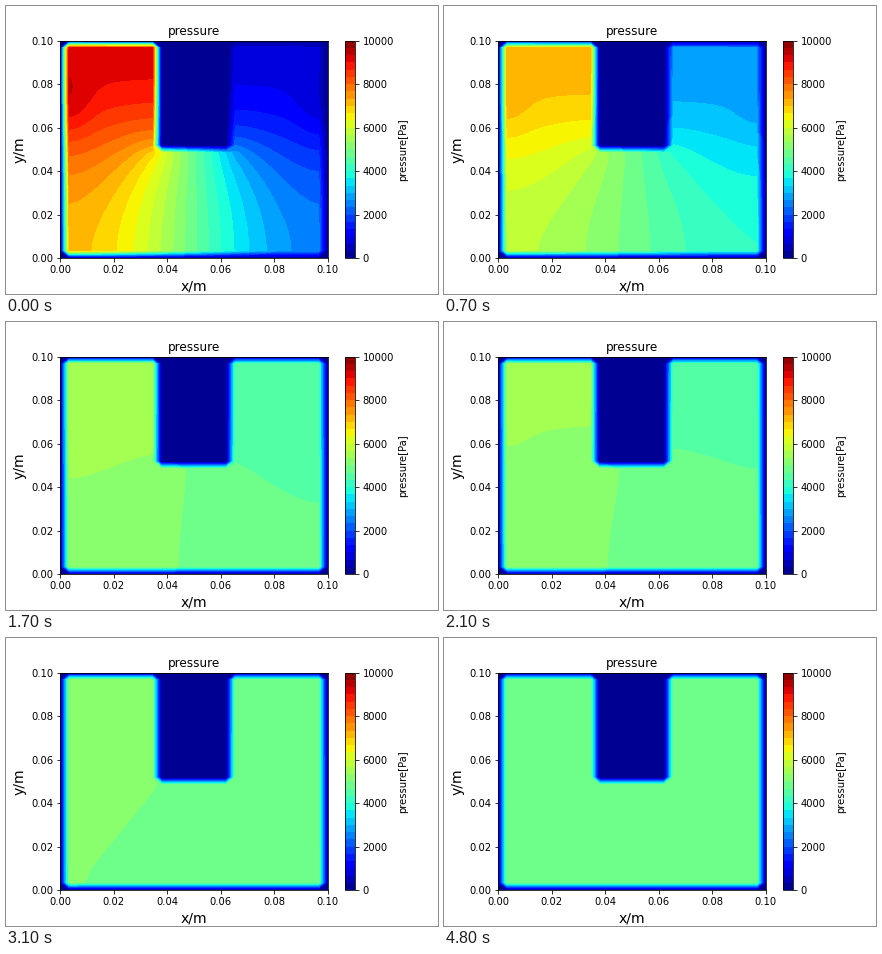
Recreate the animation shown at these times as a matplotlib script. Size 432x288 px, loop 5000 ms.

```python
import numpy as np
import matplotlib.pyplot as plt
from matplotlib.animation import FuncAnimation

N = 30                 # grid nodes per side
FRAMES = 50
INTERVAL = 100         # ms
SIZE = 0.1             # m
PMAX = 10000           # Pa
LEVELS = np.linspace(0, PMAX, 31)

axis = np.linspace(0, SIZE, N)
X, Y = np.meshgrid(axis, axis)

# U-shaped cavity: an outer wall and a block hanging from the top
fluid = np.zeros((N, N), bool)
fluid[1:-1, 1:-1] = True
fluid[15:, 11:19] = False
open_x = fluid[:, 1:] & fluid[:, :-1]
open_y = fluid[1:] & fluid[:-1]


def diffuse(u, steps):
    """Explicit diffusion with closed walls."""
    for _ in range(steps):
        gx = 0.2 * np.diff(u, axis=1) * open_x
        gy = 0.2 * np.diff(u, axis=0) * open_y
        u[:, :-1] += gx
        u[:, 1:] -= gx
        u[:-1] += gy
        u[1:] -= gy
    return u


def wall_bump(x0):
    """Local extremum beside an outer side wall."""
    return 0.1 * np.exp(-((X - x0) / 0.008) ** 2 - ((Y - 0.071) / 0.016) ** 2)


BUMPS = wall_bump(axis[1]) - wall_bump(axis[-2])

# Decay of the pressure difference and drift of the mean level
AMP_T = [0, 0.7, 1.1, 1.7, 2.5, 3.8, 4.2, 4.9]
AMP = [4205, 2275, 1300, 600, 335, 64, 56, 50]
MEAN_T = [0, 1.7, 2.5, 3.8]
MEAN = [4992, 4992, 4960, 4940]


def pressure_fields():
    u = np.where(fluid, np.sign(SIZE / 2 - X), 0.0)
    diffuse(u, 440)
    fields = []
    for i in range(FRAMES):
        t = i * INTERVAL / 1000
        amp = np.exp(np.interp(t, AMP_T, np.log(AMP)))
        mean = np.interp(t, MEAN_T, MEAN)
        shape = u / np.abs(u).max() + BUMPS
        shape = shape - 0.06 * (1 - shape ** 2)
        p = np.clip(mean + amp * shape, 0, PMAX)
        fields.append(np.where(fluid, p, 0))
        diffuse(u, 168)
    return fields


fields = pressure_fields()

plt.rcParams["font.family"] = "DejaVu Sans"
fig, ax = plt.subplots(figsize=(6, 4), dpi=72)
fig.subplots_adjust(left=0.125, right=0.9, bottom=0.125, top=0.88)


def draw_field(p):
    return ax.contourf(X, Y, p, LEVELS, cmap="jet")


bar = fig.colorbar(draw_field(fields[0]), ax=ax)
bar.set_ticks(np.arange(0, PMAX + 1, 2000))
bar.set_label("pressure[Pa]")

ax.set_title("pressure", fontsize=12)
ax.set_xlabel("x/m", fontsize=14)
ax.set_ylabel("y/m", fontsize=14)
ticks = np.linspace(0, SIZE, 6)
labels = [f"{v:.2f}" for v in ticks]
ax.set_xticks(ticks, labels)
ax.set_yticks(ticks, labels)
ax.set_xlim(0, SIZE)
ax.set_ylim(0, SIZE)

layer = []


def update(i):
    while layer:
        layer.pop().remove()
    layer.append(draw_field(fields[i]))
    return layer


anim = FuncAnimation(fig, update, frames=FRAMES, init_func=lambda: update(0),
                     interval=INTERVAL, repeat=True, repeat_delay=0, blit=False)
plt.show()
```
